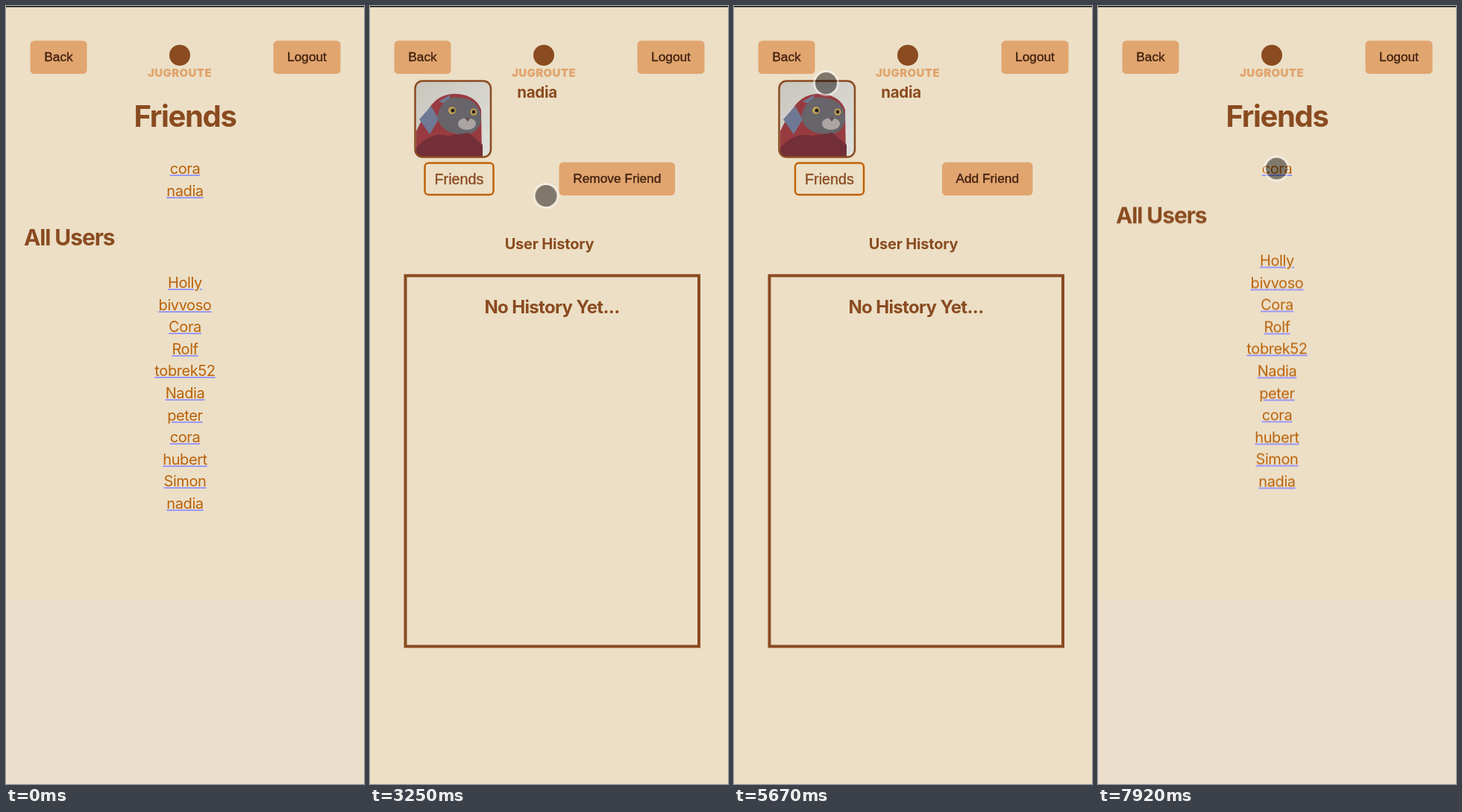
An HTML page for the animation above (8000 ms loop, 480x1043 px).

```html
<!DOCTYPE html>
<html lang="en">
<head>
<meta charset="utf-8">
<title>Coffee finder</title>
<style>
html, body { margin: 0; width: 100%; height: 100%; overflow: hidden; background: #ecdfc6; }
svg { display: block; position: absolute; left: 0; top: 0; }
.inter { font-family: Inter, sans-serif; }
.arial { font-family: "Liberation Sans", Arial, sans-serif; font-size: 17.3px; }
.roboto { font-family: Roboto, sans-serif; }
.bold { font-weight: 700; }
.mid { text-anchor: middle; }
.brown { fill: #8a4b20; color: #8a4b20; }
.tan { fill: #e1a56f; }
.dark { fill: #40200f; color: #40200f; }
.heavy { fill: currentColor; stroke: currentColor; stroke-width: .35px; }

.list { position: absolute; left: 0; width: 480px; text-align: center; font: 20px/29.6px Inter, sans-serif; letter-spacing: -.4px; color: #b9610a; }
.list span { text-decoration: underline 2px #9a98f6; text-underline-offset: 1px; }
.cursor { position: absolute; left: -17.5px; top: -17.5px; width: 29px; height: 29px; border: 3px solid rgba(255,255,255,.45); border-radius: 50%; }
.cursor::before { content: ""; position: absolute; inset: 0; border-radius: 50%; background: rgba(0,0,0,.46); }

/* Pages and parts switch hard */
.friends, .profile, .home, .remove, .add, .gone, .lower, .status, .loaded { animation: 8s step-end infinite; }
.friends { animation-name: friends; }
.profile { animation-name: profile; }
.home { animation-name: home; }
.remove { animation-name: remove; }
.add { animation-name: add; }
.gone { animation-name: gone; }
.lower { animation-name: lower; }
.status { animation-name: status; }
.loaded { animation-name: loaded; }
.map { animation: map 8s linear infinite; }
.cursor { animation: move 8s ease-in-out infinite, show 8s step-end infinite; }
@keyframes friends { 0% { opacity: 1 } 35.4% { opacity: 0 } 90.6%, 100% { opacity: 1 } }
@keyframes profile { 0% { opacity: 0 } 35.4% { opacity: 1 } 75%, 100% { opacity: 0 } }
@keyframes home { 0% { opacity: 0 } 75% { opacity: 1 } 90.6%, 100% { opacity: 0 } }
@keyframes remove { 0% { opacity: 1 } 58.3%, 100% { opacity: 0 } }
@keyframes add { 0% { opacity: 0 } 58.3%, 100% { opacity: 1 } }
@keyframes gone { 0% { opacity: 1 } 75%, 100% { opacity: 0 } }
@keyframes lower { 0% { transform: none } 75%, 100% { transform: translateY(-29.6px) } }
@keyframes status { 0% { opacity: 0 } 76% { opacity: 1 } 83.3%, 100% { opacity: 0 } }
@keyframes loaded { 0% { opacity: 0 } 83.3%, 100% { opacity: 1 } }
@keyframes map { 0%, 79.2% { opacity: 0 } 82.7%, 100% { opacity: 1 } }
@keyframes show { 0% { opacity: 0 } 3.1%, 100% { opacity: 1 } }
@keyframes move {
  0%, 3.1% { transform: translate(443px, 825px) }
  11% { transform: translate(330px, 430px) }
  22% { transform: translate(252px, 282px) }
  29.1%, 46.8% { transform: translate(235.5px, 254px) }
  52.1%, 61.5% { transform: translate(263px, 246px) }
  70.87% { transform: translate(123px, 103px) }
  73%, 81.2% { transform: translate(79px, 79px) }
  86.5%, 91.6% { transform: translate(145px, 149px) }
  98.9%, 100% { transform: translate(239px, 217.5px) }
}
</style>
</head>
<body>
<svg width="480" height="1043" viewBox="0 0 480 1043">
  <defs>
    <clipPath id="mapBox"><rect x="24" y="298" width="433.5" height="418"/></clipPath>
    <clipPath id="photo"><rect x="61" y="101" width="100.5" height="101" rx="10"/></clipPath>
    <linearGradient id="wall" x2="1" y2="1"><stop stop-color="#c9c5bd"/><stop offset="1" stop-color="#dfe1dc"/></linearGradient>
    <filter id="soft" x="-20%" y="-30%" width="140%" height="170%"><feDropShadow dx="0" dy="2" stdDeviation="2" flood-opacity=".35"/></filter>
    <filter id="glow" x="-30%" y="-120%" width="160%" height="340%"><feDropShadow dx="0" dy="0" stdDeviation="8" flood-opacity=".4"/></filter>
    <pattern id="town" width="17" height="25" patternUnits="userSpaceOnUse" patternTransform="rotate(-55)">
      <path d="M0 1H17M1 0V25M0 13H17" stroke="#fff" stroke-width="1.2"/>
    </pattern>
    <pattern id="east" width="19" height="27" patternUnits="userSpaceOnUse" patternTransform="rotate(-8)">
      <path d="M0 1H19M1 0V27" stroke="#fff" stroke-width="1.1"/>
    </pattern>
    <g id="cup" stroke="currentColor" stroke-width="2.3" fill="none">
      <path d="M-9-10H5V2a4 4 0 0 1-4 4H-5a4 4 0 0 1-4-4Z" fill="currentColor" fill-opacity=".35"/>
      <path d="M5-9.5H11V-3H5M-13 10.5H10"/>
    </g>
    <g id="interstate">
      <path d="M-7-8Q-4-6 0-8Q4-6 7-8Q13 3 0 10Q-13 3-7-8Z" fill="#4d73b8" stroke="#fff"/>
      <path d="M-7-7.5Q-4-5.5 0-7.5Q4-5.5 7-7.5L8-4H-8Z" fill="#c5474d"/>
    </g>
  </defs>

  <rect width="480" height="1043" fill="#ecdfc6"/>

  <g class="friends">
    <rect y="795" width="480" height="248" fill="#ebdfcb"/>
    <g class="top"></g>
    <text class="inter bold brown mid" x="240" y="162" font-size="40" letter-spacing="-1.3">Friends</text>
    <g class="lower"><text class="inter bold brown" x="24" y="321" font-size="30" letter-spacing="-1.1">All Users</text></g>
  </g>

  <g class="profile">
    <g class="top"></g>
    <g clip-path="url(#photo)">
      <rect x="60" y="100" width="103" height="103" fill="url(#wall)"/>
      <path d="M62 202V168Q70 150 82 133Q96 116 118 118Q142 120 149 139L150 202Z" fill="#983b40"/>
      <path d="M66 152L82 134L92 152L80 172ZM92 128L108 119L104 132Z" fill="#6f7994"/>
      <path d="M90 148Q98 118 122 123Q149 126 149 153Q145 174 122 172Q94 170 90 148Z" fill="#67646a"/>
      <path d="M62 190Q82 168 104 174L132 170L151 186V203H62Z" fill="#722f37"/>
      <ellipse cx="130" cy="158" rx="12" ry="8" fill="#aaa5a3"/>
      <g fill="#c4a451"><circle cx="110" cy="140" r="5"/><circle cx="139" cy="142" r="4.5"/></g>
      <g fill="#252126"><circle cx="111" cy="140" r="2.6"/><circle cx="139" cy="142" r="2.4"/></g>
      <path d="M127 150h8l-4 5Z" fill="#665052"/>
    </g>
    <rect x="60.5" y="100.5" width="101.5" height="102" rx="10" fill="none" stroke="#8a4b20" stroke-width="2.5"/>
    <text class="inter bold brown mid" x="224" y="123" font-size="20.5" letter-spacing="-.3">nadia</text>
    <g class="remove" id="removeRow"></g>
    <g class="add" id="addRow"></g>
    <text class="inter bold brown mid" x="240.5" y="326" font-size="20" letter-spacing="-.2">User History</text>
    <rect x="47.5" y="361.5" width="393.5" height="497" fill="none" stroke="#8a4b20" stroke-width="4"/>
    <text class="inter bold brown mid" x="244" y="412" font-size="24" letter-spacing="-.65">No History Yet...</text>
  </g>

  <g class="home roboto">
    <rect class="status" y="795" width="480" height="248" fill="#ebdfcb"/>
    <text class="brown heavy" x="23" y="82" font-size="61" letter-spacing="15">JugRoute</text>
    <text class="brown heavy" x="24" y="119" font-size="20">Welcome, hubert</text>
    <rect x="24" y="133" width="305" height="26.5" rx="3" fill="#5c5c5c"/>
    <path d="M94.5 133v26M169 133v26M274.5 133v26" stroke="#85827d"/>
    <g class="arial heavy" color="#fff" style="font-size:16.5px">
      <text x="34" y="151.5">Logout</text><text x="104" y="151.5">Friends</text>
      <text x="179" y="151.5">User Profile</text><text x="284" y="151.5">Chat</text>
    </g>
    <rect x="24.5" y="160" width="432.5" height="68" rx="5" fill="none" stroke="#b0a591" stroke-width="1.3"/>
    <text class="heavy" x="41.5" y="200" font-size="20" color="#544b42">Show me coffee shops in...</text>
    <rect class="tan" x="24" y="241" width="433.5" height="45.5" rx="5" filter="url(#soft)"/>
    <g fill="none" stroke="#40200f" stroke-width="2.8"><circle cx="203" cy="260.5" r="6.7"/><path d="M208 265.5l8 8"/></g>
    <text class="dark heavy" x="221" y="269.5" font-size="17.5" font-weight="500" letter-spacing=".2">SEARCH</text>

    <g clip-path="url(#mapBox)">
      <rect x="24" y="298" width="434" height="418" fill="#fff"/>
      <g class="map">
        <rect x="24" y="298" width="434" height="418" fill="#dce1e6"/>
        <rect x="24" y="298" width="345" height="418" fill="url(#town)"/>
        <path d="M370 298H458V716H350V540Z" fill="#dfe3e7"/>
        <path d="M375 298H458V716H352V570Z" fill="url(#east)"/>
        <path d="M300 430L365 395L420 400L400 470L350 490L300 465Z" fill="#d8dde2"/>
        <g fill="#9dd4af">
          <path d="M203 298H309L299 325L286 345L264 352L240 337L222 322Z"/>
          <path d="M300 378Q325 350 368 345L385 352Q340 358 304 388ZM135 420l18-5 8 8-20 10ZM120 448l14 5-7 8-11-6ZM168 541l8-5 4 7-8 6ZM422 606l12-10 5 12-12 20Z"/>
          <path d="M370 298h24l-5 14-14 3Z"/>
        </g>
        <path d="M113 303l10 2 6 16-4 28-8-4-4-18Z" fill="#8eb5f3"/>
        <g id="roads" fill="none" stroke-linecap="round" stroke-linejoin="round">
          <path d="M24 505L190 595L260 640L330 660M24 465L120 515L230 570L345 600M180 298L195 370L205 420M205 298L255 375M75 716L220 520L300 430L390 345M115 716L245 548L310 482M150 716L260 580M215 716L265 640L300 560M321 590V716M24 360L110 390L205 420M24 420L95 350L150 298M380 660H457M430 300L400 400L395 500" stroke="#fff" stroke-width="2.6"/>
          <path d="M376 388Q358 425 363 460Q335 510 341 565Q354 620 346 716" stroke="#cbd3dc" stroke-width="9"/>
          <path d="M376 388Q359 425 364 460Q338 512 344 566Q356 622 348 716" stroke="#8eb5f6" stroke-width="3.6"/>
        </g>
        <g id="labels" text-anchor="middle" fill="#50565c" stroke="#fff" stroke-width="2.5" paint-order="stroke" stroke-linejoin="round"></g>
        <rect x="284" y="464" width="16" height="16" rx="2" fill="#3a6fc4"/>
        <path d="M288 467h8v8h-8ZM289 478l2-2m4 0l2 2" fill="none" stroke="#fff" stroke-width="1.6"/>
      </g>
      <g class="loaded">
        <g id="pins" color="#8a4b20"></g>
        <rect x="37" y="688" width="22" height="22" rx="2" fill="#fff" stroke="#a9adb1"/>
        <rect x="144" y="700" width="314" height="16" fill="#f5f5f5" opacity=".7"/>
        <g class="heavy" font-size="12.5" color="#000">
          <text x="147.5" y="712">Keyboard shortcuts</text><text x="269" y="712">Map data ©2023</text><text x="376.5" y="712">Terms of Use</text>
        </g>
        <g fill="#fff" filter="url(#soft)"><rect x="395.5" y="311" width="49.5" height="49" rx="2"/><rect x="395.5" y="586" width="49.5" height="100" rx="2"/></g>
        <path d="M410 332v-7h7m6 0h7v7m0 6v7h-7m-6 0h-7v-7" fill="none" stroke="#666" stroke-width="3"/>
        <path d="M402 636h37" stroke="#e2e2e2"/>
        <path d="M409 611h22m-11-11v22M409 661h22" stroke="#5e5e5e" stroke-width="4.6"/>
      </g>
    </g>

    <g class="loaded">
      <g id="shops" color="#4a2410"></g>
      <rect x="448.5" y="720" width="3.5" height="266" fill="#918c85"/>
    </g>
    <g class="status">
      <path d="M0 1011H152Q158 1011 158 1017V1043H0Z" fill="#1c1e20" filter="url(#glow)"/>
      <text class="inter heavy" x="8" y="1034" font-size="17.5" color="#fff">Waiting for fire...</text>
    </g>
  </g>

  <rect width="480" height="1.5" fill="#111"/>
</svg>

<div class="friends">
  <div class="list" style="top:204px"><span>cora</span><br><span class="gone">nadia</span></div>
  <div class="list lower" id="users" style="top:357px"></div>
</div>
<div class="cursor"></div>

<script>
const fill = (s, html) => document.querySelectorAll(s).forEach(e => e.insertAdjacentHTML('beforeend', html));

const button = (x, y, w, label) =>
  `<rect class="tan" x="${x}" y="${y}" width="${w}" height="44.5" rx="5.5"/>
   <text class="arial dark heavy mid" x="${x + w / 2}" y="${y + 27.8}">${label}</text>`;
const badge = x =>
  `<rect x="${x}" y="210.5" width="92" height="42.5" rx="5" fill="none" stroke="#c06208" stroke-width="2.5"/>
   <text class="arial brown heavy mid" x="${x + 46}" y="238.5" style="font-size:19.8px">Friends</text>`;

fill('.top', button(32.5, 46.5, 76, 'Back') + button(358.5, 46.5, 90, 'Logout') +
  `<circle class="brown" cx="233" cy="66" r="14"/>
   <text class="inter tan mid" x="233" y="94.5" font-size="15" font-weight="900" letter-spacing=".4">JUGROUTE</text>`);
fill('#removeRow', badge(73.5) + button(253.5, 209.5, 155.5, 'Remove Friend'));
fill('#addRow', badge(82) + button(279, 209.5, 121.5, 'Add Friend'));

const users = 'Holly bivvoso Cora Rolf tobrek52 Nadia peter cora hubert Simon nadia';
fill('#users', users.split(' ').map(u => `<span>${u}</span>`).join('<br>'));

// Highways: a darker casing below a pale core
const highways = [
  'M24 299Q75 318 110 335Q165 375 204 417Q250 465 300 487Q350 497 380 498Q404 512 408 560Q402 630 412 680L457 708',
  'M325 298Q300 350 272 374Q225 395 204 417L150 480L90 535Q40 585 24 645',
  'M24 618Q60 648 100 670Q145 697 195 711L300 722',
  'M376 298Q410 355 440 385Q451 425 448 465L457 500',
  'M380 498Q410 495 457 471',
  'M407 640Q430 590 457 555',
  'M412 680Q400 695 370 718'
];
for (const [color, width] of [['#f3b044', 6.5], ['#fde09a', 3.2]])
  fill('#roads', highways.map(d => `<path d="${d}" stroke="${color}" stroke-width="${width}"/>`).join(''));

const label = (x, y, text, size, turn = 0, extra = '') =>
  `<text transform="translate(${x} ${y}) rotate(${turn})" y="${size * .36}" font-size="${size}" ${extra}>${text}</text>`;
const streets = [
  [64, 351, 'W Harrow St', 22], [192, 357, 'Linden Blvd', 78], [228, 345, 'Juniper Way', 52],
  [365, 340, 'N Ashgrove', -10], [340, 369, 'N Willow St', -33], [389, 380, 'N Fern St', 18],
  [91, 484, 'Elm St', 28], [45, 495, 'Oak St', 28], [249, 549, 'E Fir St', 25],
  [286, 536, 'Ivy St', 10], [246, 607, 'Elm St', 33], [106, 635, 'S Reed St', -52],
  [156, 620, 'S Cedar Grove St', -46], [148, 653, 'Poppy Ave', -56], [198, 630, 'Old Ferry St', -46],
  [244, 668, 'S Orchard Ave', -60], [297, 658, 'Oak St', 5], [321, 682, 'Clove St', 88],
  [422, 489, 'Stone Marten', -18], [80, 706, 'St', -50]
];
const areas = [
  [279, 419, 'CHINATOWN'], [47, 456, 'TLAKE'], [93, 587, 'SOUTH PARK'], [239, 577, 'SKID ROW'],
  [320, 597, 'ARTS DISTRICT'], [432, 702, 'BOYLE'], [447, 313, 'LIN'], [446, 328, 'HE']
];
const routes = [[153, 373, 101], [281, 369, 110], [117, 513, 110], [403, 590, 101]];
const interstates = [[447, 439, 5], [436, 578, 10], [140, 697, 10], [411, 674, 5], [23, 662, 5]];

fill('#labels',
  streets.map(([x, y, s, turn]) => label(x, y, s, 12.5, turn)).join('') +
  areas.map(([x, y, s]) => label(x, y, s, 14, 0, 'letter-spacing="1.5"')).join('') +
  routes.map(([x, y, n]) =>
    `<rect x="${x - 12.5}" y="${y - 8}" width="25" height="16" rx="7" stroke="#777d83" stroke-width="1.3" fill="#fff"/>` +
    label(x, y, n, 11, 0, 'stroke="none"')).join('') +
  interstates.map(([x, y, n]) => `<use href="#interstate" x="${x}" y="${y}" stroke-width="1"/>` +
    label(x, y + 1, n, 10.5, 0, 'fill="#fff" stroke="none" font-weight="700"')).join('') +
  label(240, 506.5, 'Los Angeles', 32, 0, 'class="heavy" color="#151719"'));

const pins = [[197, 515], [229, 517], [220, 535], [223, 535], [270, 532], [279, 549], [236, 554], [198, 580], [178, 606], [324, 576]];
fill('#pins', pins.map(([x, y]) => `<use href="#cup" x="${x}" y="${y}"/>`).join(''));

const shops = ['Ferl Coffee Bar', 'The Froth Shed', 'Pale Wren Coffee', 'Cafe Norvi', 'Dovu Coffee Roasters'];
fill('#shops', shops.map((s, i) => {
  const y = 762 + i * 60.5;
  return `<use href="#cup" x="101" y="${y}"/>
    <text class="heavy" x="115.5" y="${y + 7}" font-size="20" text-decoration="underline">${s}</text>`;
}).join(''));
</script>
</body>
</html>
```
